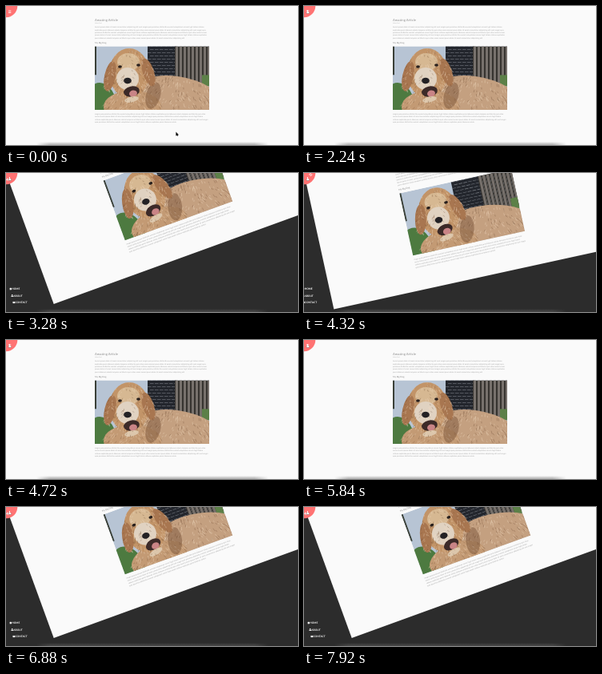
Animation, 365 px wide and 174 px high, one loop 8000 ms. Source, as an HTML page with a canvas:

```html
<!DOCTYPE html>
<html lang="en">
<head>
<meta charset="utf-8">
<title>Rotating navigation</title>
<style>
  html, body { margin: 0; width: 100%; height: 100%; overflow: hidden; background: #2c2c2c; }
  canvas { display: block; width: 365px; height: 174px; }
</style>
</head>
<body>
<canvas id="stage"></canvas>
<script>
const W = 365, H = 174, LOOP = 8000;
const OPEN_1 = 2350, CLOSE_1 = 4130, OPEN_2 = 6040;
const TURN = 500, SLIDE = 400, SLIDE_DELAY = 300;
const LEFT = 111, LINE = 3.43;
const PHOTO = { x: LEFT, y: 50.4, w: 143, h: 79.7 };

const canvas = document.getElementById('stage');
const ctx = canvas.getContext('2d');
const dpr = window.devicePixelRatio || 1;
canvas.width = W * dpr;
canvas.height = H * dpr;

const clamp = v => Math.max(0, Math.min(1, v));
const mix = (a, b, k) => a + (b - a) * k;
const rad = deg => deg * Math.PI / 180;

// cubic-bezier(.42, 0, 1, 1)
function easeIn(x) {
  let lo = 0, hi = 1;
  for (let i = 0; i < 20; i++) {
    const s = (lo + hi) / 2;
    const bx = 1.26 * s * (1 - s) ** 2 + 3 * s * s * (1 - s) + s ** 3;
    if (bx < x) lo = s; else hi = s;
  }
  return 3 * lo * lo * (1 - lo) + lo ** 3;
}

function turnAt(t) {
  if (t < CLOSE_1) return clamp((t - OPEN_1) / TURN);
  if (t < OPEN_2) return 1 - clamp((t - CLOSE_1) / TURN);
  return clamp((t - OPEN_2) / TURN);
}

function navAt(t) {
  const opened = start => easeIn(clamp((t - start - SLIDE_DELAY) / SLIDE));
  if (t < CLOSE_1) return opened(OPEN_1);
  if (t < OPEN_2) return 1 - easeIn(clamp((t - CLOSE_1) / SLIDE));
  return opened(OPEN_2);
}

function random(seed) {
  return () => (seed = (seed * 16807) % 2147483647) / 2147483647;
}

function rect(x, y, w, h, color) {
  ctx.fillStyle = color;
  ctx.fillRect(x, y, w, h);
}

function oval(x, y, rx, ry, color, angle = 0) {
  ctx.fillStyle = color;
  ctx.beginPath();
  ctx.ellipse(x, y, rx, ry, rad(angle), 0, 2 * Math.PI);
  ctx.fill();
}

function triangle(x, y, w, h, color) {
  ctx.fillStyle = color;
  ctx.beginPath();
  ctx.moveTo(x, y);
  ctx.lineTo(x + w, y);
  ctx.lineTo(x + w / 2, y + h);
  ctx.fill();
}

// Set at ten times the size and scaled down to keep tiny type even
function text(str, x, y, size, color, weight = 400) {
  ctx.save();
  ctx.translate(x, y);
  ctx.scale(.1, .1);
  ctx.textRendering = 'geometricPrecision';
  ctx.font = `${weight} ${size * 10}px Lato, sans-serif`;
  ctx.fillStyle = color;
  ctx.fillText(str, 0, 0);
  ctx.restore();
}

const WORDS = ('Lorem ipsum dolor sit amet consectetur adipisicing elit sunt magni ' +
  'quia possimus distinctio eveniet voluptatum rerum fugit totam ratione explicabo ' +
  'porro laborum soluta tempore architecto quis vitae nemo').split(' ');

function breakLines(first, count, width, lastWidth) {
  let n = first;
  ctx.font = '400 22.9px Lato, sans-serif';
  return Array.from({ length: count }, (_, i) => {
    const limit = 10 * (i < count - 1 ? width : lastWidth);
    let line = WORDS[n++ % WORDS.length];
    for (;;) {
      const next = line + ' ' + WORDS[n % WORDS.length];
      if (ctx.measureText(next).width > limit) return line;
      line = next;
      n++;
    }
  });
}

const intro = breakLines(0, 5, 140, 113);
const outro = breakLines(9, 4, 142, 104);

function paragraph(lines, y, color) {
  lines.forEach((line, i) => text(line, LEFT, y + i * LINE, 2.29, color));
}

function backdrop() {
  const { x, y, w, h } = PHOTO;
  rect(x, y, w, h, '#b7c4d4');
  rect(x, y, 2, h * .45, '#3a4038');
  oval(x + 6, y + h, 22, 34, '#4d7a40');
  rect(x + 66, y, 36, h / 2, '#23262d');
  for (let row = 0; row < 10; row++) {
    for (let i = 0; i < 6; i++) rect(x + 66 + i * 6 + (row % 2) * 3, y + row * 4, 4.6, .6, '#777b82');
  }
  for (let i = 0; i < 9; i++) {
    rect(x + 100 + i * 5, y, 5, h * .6, '#36332f');
    rect(x + 101 + i * 5, y, 3, h * .6, '#77716c');
  }
  rect(x + w - 9, y + 36, 9, 14, '#5c8048');
}

// A coat of seeded strokes hanging outward from the middle
function fur(x, y, rx, ry, color, seed, angle = 0) {
  oval(x, y, rx, ry, color, angle);
  const rnd = random(seed * 7919);
  ctx.save();
  ctx.translate(x, y);
  ctx.rotate(rad(angle));
  ctx.lineWidth = .8;
  for (let i = 0; i < rx * ry / 5; i++) {
    const a = rnd() * 2 * Math.PI, r = Math.sqrt(rnd());
    const px = Math.cos(a) * r * rx, py = Math.sin(a) * r * ry;
    ctx.strokeStyle = rnd() < .55 ? 'rgba(240,218,192,.45)' : 'rgba(100,66,42,.35)';
    ctx.beginPath();
    ctx.moveTo(px, py);
    ctx.lineTo(px + Math.cos(a) * 2, py + 1 + rnd() * 3);
    ctx.stroke();
  }
  ctx.restore();
}

function dog() {
  fur(212, 116, 58, 28, '#c4a080', 1, 8);
  fur(158, 126, 36, 20, '#c39a74', 2);
  oval(184, 112, 9, 17, 'rgba(105,68,44,.4)', 15);
  fur(154, 84, 25, 31, '#c29468', 3);
  fur(130, 88, 7, 19, '#a87650', 4, 12);
  fur(178, 83, 7, 18, '#a87650', 5, -18);
  fur(153, 70, 14, 11, '#d6b892', 6);
  fur(152, 91, 14, 14, '#e0d2c1', 7);
  oval(157, 107, 10, 6.5, '#3c2a28', -12);
  oval(159, 109.5, 5, 4, '#c98486', -12);
  fur(157, 117, 9, 3.5, '#dcc6ab', 8, -12);
  for (const side of [-1, 1]) oval(154 + side * 11.5, 75 - side, 2.4, 1.7, '#29201d');
  oval(152, 93.5, 4.8, 3.8, '#232124');
}

function photo() {
  const { x, y, w, h } = PHOTO;
  ctx.save();
  ctx.beginPath();
  ctx.rect(x, y, w, h);
  ctx.clip();
  backdrop();
  dog();
  ctx.restore();
}

function page(turn) {
  ctx.save();
  ctx.rotate(rad(-20 * turn));
  rect(0, 0, 420, 174.6, '#fafafa');
  text('Amazing Article', LEFT, 18.6, 4.2, '#909090');
  text('Nelan Rud', LEFT, 22, 1.9, '#b5b5b5');
  paragraph(intro, 27.2, '#a2a2a2');
  text('My Big Dog', LEFT, 46.8, 2.8, '#8c8c8c');
  photo();
  paragraph(outro, 136, '#a2a2a2');
  ctx.restore();
}

function dial(turn) {
  ctx.save();
  ctx.rotate(rad(-70 * turn));
  oval(0, 0, 14.3, 14.3, '#ff7373');
  for (let i = -1; i <= 1; i++) rect(3, 6.8 + i * 1.25, 3.3, .65, '#fff');
  ctx.translate(-7.1, 4.5);
  for (const side of [-1, 1]) {
    ctx.save();
    ctx.rotate(side * Math.PI / 4);
    rect(-1.7, -.4, 3.4, .8, '#fff');
    ctx.restore();
  }
  ctx.restore();
}

const icons = {
  HOME(x, y) {
    triangle(x, y, 3, -1.5, '#fff');
    rect(x + .5, y - .1, 2, 1.4, '#fff');
  },
  ABOUT(x, y) {
    oval(x + 1.4, y - .7, .8, .8, '#fff');
    rect(x + .1, y + .2, 2.6, 1.2, '#fff');
  },
  CONTACT(x, y) {
    rect(x, y - 1.1, 2.8, 2.2, '#fff');
    triangle(x, y - .8, 2.8, .9, '#999');
  }
};

function nav(shown) {
  Object.keys(icons).forEach((label, i) => {
    const indent = 2.14 * i;
    const away = (22.5 - indent) * (1 + i / 2);
    const x = 4.2 + indent - away * (1 - shown);
    const y = 145 + i * 8.5;
    icons[label](x, y);
    text(label, x + 3, y + 1.2, 3.25, '#fff', 700);
  });
}

// Faint shade along the lower edge, fading out at both ends
function dockShade() {
  const shade = ctx.createLinearGradient(38, 0, 328, 0);
  for (const end of [0, 1]) {
    shade.addColorStop(end, 'rgba(100,100,100,0)');
    shade.addColorStop(mix(end, .5, .12), 'rgba(100,100,100,.16)');
  }
  for (let i = 0; i < 4; i++) rect(38, 170.5 + i, 290, H, shade);
}

function arrow() {
  ctx.rotate(rad(-22));
  triangle(-1.9, 4.4, 3.8, -4.6, '#111');
  rect(-.4, 4, .8, 1.5, '#111');
}

function hand() {
  oval(.4, 3.3, 1.9, 1.6, '#6b4040');
  oval(.4, 3.3, 1.6, 1.3, '#fff');
  rect(-.5, 0, 1, 3, '#fff');
}

function cursor(t) {
  const glide = clamp((t - 960) / 240);
  ctx.save();
  if (t < 160) ctx.translate(212.5, 157.8);
  else if (t < 400) ctx.translate(11, 13);
  else ctx.translate(mix(10, 4.4, glide), mix(8, 5, glide));
  if (t < 400) arrow(); else hand();
  ctx.restore();
}

function draw(t) {
  const turn = turnAt(t);
  ctx.setTransform(dpr, 0, 0, dpr, 0, 0);
  rect(0, 0, W, H, '#2c2c2c');
  page(turn);
  dial(turn);
  nav(navAt(t));
  dockShade();
  cursor(t);
}

const begin = performance.now();
function tick() {
  draw((performance.now() - begin) % LOOP);
  requestAnimationFrame(tick);
}
tick();
</script>
</body>
</html>
```
